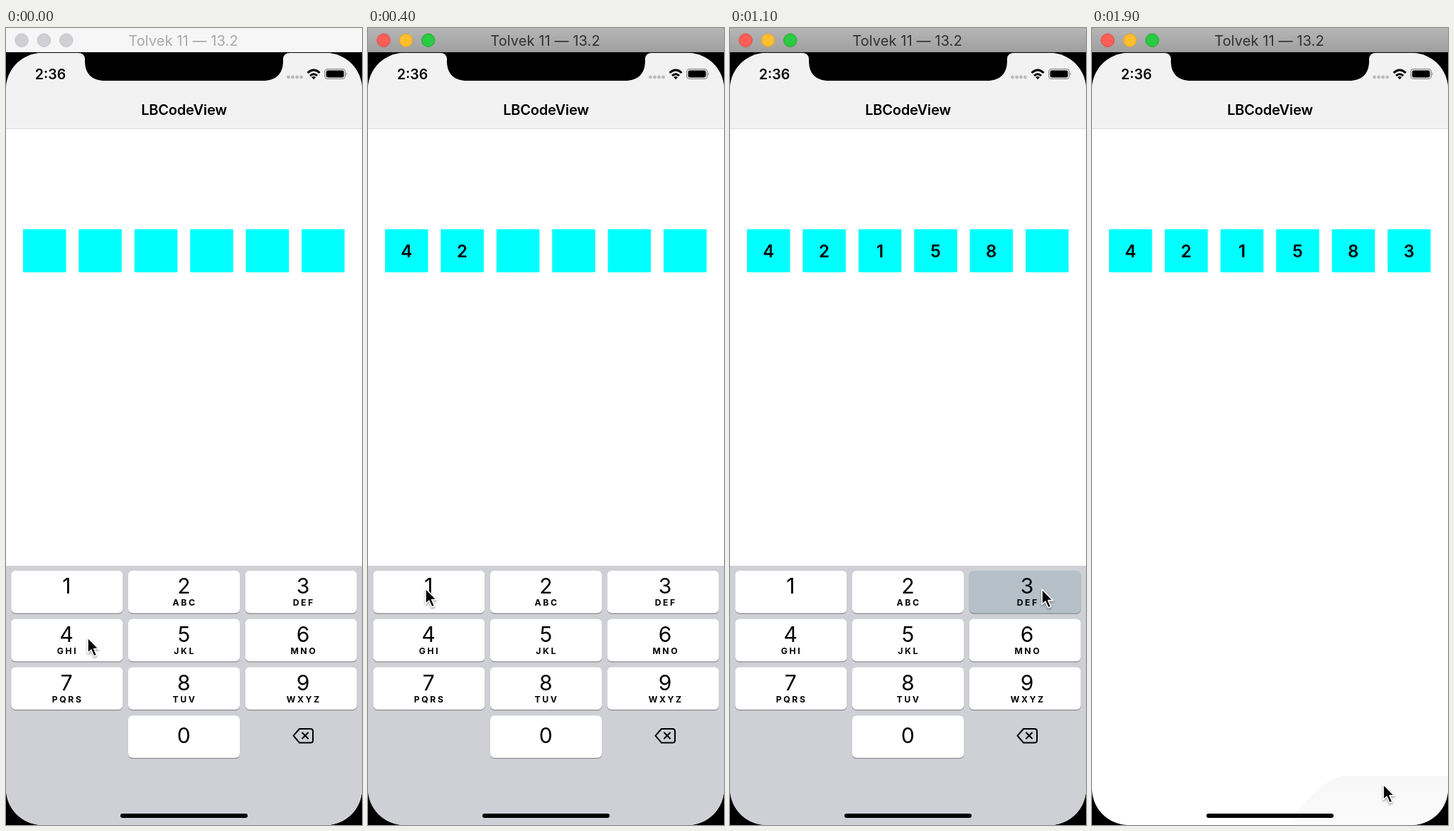
An HTML page for the animation above (2 s loop, 501 by 1119 pixels).

```html
<!DOCTYPE html>
<html lang="en">
<head>
<meta charset="utf-8">
<title>Code entry</title>
<style>
  html, body { margin: 0; width: 100%; height: 100%; overflow: hidden; background: #000; }
  svg { display: block; width: 501px; height: 1119px; font-family: Inter, sans-serif; }
  text { text-anchor: middle; }

  .loop, .cell, .key rect, #idle, #active, #keyboard, #cursor {
    animation: 2s step-end infinite;
  }
  .cell { font-size: 24px; font-weight: 600; }
  .num { font-size: 30px; }
  .abc { font-size: 12.2px; font-weight: 700; letter-spacing: 2.6px; }

  #idle { animation-name: blur; }
  #active { animation-name: focus; }
  @keyframes blur { 0% { opacity: 1 } 5%, to { opacity: 0 } }
  @keyframes focus { 0% { opacity: 0 } 5%, to { opacity: 1 } }

  #c0 { animation-name: focus; }
  #c1 { animation-name: type1; }
  #c2 { animation-name: type2; }
  #c3 { animation-name: type3; }
  #c4 { animation-name: type4; }
  #c5 { animation-name: type5; }
  @keyframes type1 { 0% { opacity: 0 } 15%, to { opacity: 1 } }
  @keyframes type2 { 0% { opacity: 0 } 25%, to { opacity: 1 } }
  @keyframes type3 { 0% { opacity: 0 } 35%, to { opacity: 1 } }
  @keyframes type4 { 0% { opacity: 0 } 45%, to { opacity: 1 } }
  @keyframes type5 { 0% { opacity: 0 } 60%, to { opacity: 1 } }

  .key .cap { fill: #fff; }
  #k2 .cap { animation-name: press2; }
  #k5 .cap { animation-name: press5; }
  #k3 .cap { animation-name: press3; }
  @keyframes press2 { 0% { fill: #fff } 10% { fill: #b5c0c9 } 15%, to { fill: #fff } }
  @keyframes press5 { 0% { fill: #fff } 30% { fill: #b5c0c9 } 35%, to { fill: #fff } }
  @keyframes press3 { 0% { fill: #fff } 55% { fill: #b5c0c9 } 60%, to { fill: #fff } }

  #keyboard { animation-name: dismiss; }
  @keyframes dismiss {
    0% { transform: translateY(0) }
    60% { transform: translateY(356px) }
    65%, to { transform: translateY(400px) }
  }

  #cursor { animation-name: point; filter: drop-shadow(0 2px 1.5px rgba(0, 0, 0, .35)); }
  @keyframes point {
    0% { transform: translate(115px, 856px) }
    10% { transform: translate(236px, 792px) }
    15% { transform: translate(228px, 790px) }
    20% { transform: translate(81px, 787px) }
    30% { transform: translate(229px, 856px) }
    35% { transform: translate(231px, 902px) }
    45% { transform: translate(330px, 850px) }
    50% { transform: translate(439px, 788px) }
    75% { transform: translate(437px, 806px) }
    80% { transform: translate(432px, 860px) }
    85% { transform: translate(424px, 940px) }
    90% { transform: translate(414px, 1030px) }
    95%, to { transform: translate(410px, 1062px) }
  }
</style>
</head>
<body>
<svg viewBox="0 0 501 1119">
  <defs>
    <linearGradient id="chrome" x2="0" y2="1">
      <stop stop-color="#b6b6b6"/><stop offset="1" stop-color="#9f9f9f"/>
    </linearGradient>
    <linearGradient id="haze" x2="0" y2="1">
      <stop stop-color="#f7f7f7"/><stop offset="1" stop-color="#fbfbfb"/>
    </linearGradient>
    <clipPath id="screen"><rect y="35" width="501" height="1084" rx="51"/></clipPath>
  </defs>

  <rect width="501" height="1119"/>
  <g id="idle"><rect width="501" height="34" fill="#f6f6f6"/></g>
  <g id="active"><rect width="501" height="34" fill="url(#chrome)"/></g>

  <g clip-path="url(#screen)">
    <rect y="35" width="501" height="1084" fill="#fff"/>
    <path d="M285 1103 Q318 1062 350 1050 H501 V1119 H285Z" fill="url(#haze)"/>
    <rect y="35" width="501" height="106" fill="#f2f2f2"/>
    <rect y="141" width="501" height="1" fill="#dedede"/>
    <g id="cells"></g>
    <g id="keyboard">
      <rect y="755" width="501" height="364" fill="#cfd0d6"/>
      <g id="keys"></g>
      <g fill="none" stroke="#000" stroke-width="2" stroke-linejoin="round" stroke-linecap="round">
        <path d="M413 984 H428.5 Q432 984 432 987.500 V1000 Q432 1003.500 428.500 1003.500 H413 L404.500 993.700Z"/>
        <path d="M417 989.500 l8 8 m0 -8 l-8 8"/>
      </g>
    </g>
    <rect x="161" y="1103" width="179" height="6" rx="3"/>
  </g>

  <path d="M102 34 V35 Q110 35 111 43 V46 C111 65 122 74 139 74 H362 C379 74 390 65 390 46 V43 Q391 35 399 35 V34Z"/>

  <text x="62.500" y="71.500" font-size="19.600" font-weight="600">2:36</text>
  <text x="250.500" y="121.500" font-size="20" font-weight="600" letter-spacing="-.2">LBCodeView</text>

  <g fill="#bcbcbc">
    <circle cx="397.500" cy="69" r="2.400"/><circle cx="403.500" cy="69" r="2.400"/>
    <circle cx="409.500" cy="69" r="2.400"/><circle cx="415.500" cy="69" r="2.400"/>
  </g>
  <g fill="none" stroke="#000" stroke-width="3">
    <path d="M424.500 63 Q433 55 441.500 63"/>
    <path d="M428 67 Q433 62.500 438 67"/>
  </g>
  <path d="M430 69 Q433 66.800 436 69 L433 72.200Z"/>
  <rect x="448.600" y="57.600" width="28.800" height="13.800" rx="4" fill="none" stroke="#8c8c8c" stroke-width="1.200"/>
  <rect x="450.500" y="59.500" width="25" height="10" rx="2.300"/>
  <path d="M478.700 62 Q481 64.500 478.700 67Z" fill="#8c8c8c"/>

  <g id="lights"></g>

  <g id="cursor">
    <path d="M0 0 V21.500 L4.800 17 L8.800 26 L12.700 24.300 L8.800 15.600 H15.500Z"
          stroke="#fff" stroke-width="1.600" stroke-linejoin="round"/>
  </g>
</svg>
<script>
  const put = (id, html) => { document.getElementById(id).innerHTML += html; };

  [...'421583'].forEach((digit, i) => {
    const x = 24 + i * 78.4;
    put('cells', `<rect x="${x}" y="282.5" width="60.5" height="60.5" fill="#0ff"/>
      <text id="c${i}" class="cell" x="${x + 30.2}" y="321.7">${digit}</text>`);
  });

  const letters = ['', 'ABC', 'DEF', 'GHI', 'JKL', 'MNO', 'PQRS', 'TUV', 'WXYZ'];
  const labelX = [85.3, 250.3, 418];
  const addKey = (num, col, row, abc) => {
    const x = 7.3 + col * 164.7, y = 762 + row * 67.8, mid = labelX[col];
    const base = y + (abc === undefined ? 39 : 32);
    put('keys', `<g id="k${num}" class="key">
      <rect x="${x}" y="${y + 1.3}" width="157" height="59.4" rx="6" fill="#898b8f"/>
      <rect class="cap" x="${x}" y="${y}" width="157" height="59.4" rx="6"/>
      <text class="num" x="${mid}" y="${base}">${num}</text>
      <text class="abc" x="${mid + 1.3}" y="${y + 49.3}">${abc || ''}</text></g>`);
  };
  letters.forEach((abc, i) => addKey(i + 1, i % 3, Math.floor(i / 3), abc));
  addKey(0, 1, 3);

  const chrome = (id, ink, fills, rims) => {
    fills.forEach((fill, i) => put(id,
      `<circle cx="${22 + i * 31.4}" cy="17.2" r="9.2" fill="${fill}" stroke="${rims[i]}"/>`));
    put(id, `<text x="249.5" y="25" font-size="20" letter-spacing=".1" fill="${ink}">Tolvek 11 — 13.2</text>`);
  };
  chrome('idle', '#a8a8a8', Array(3).fill('#d0cfd4'), Array(3).fill('#c2c1c6'));
  chrome('active', '#303030', ['#ff5f57', '#fdbe2f', '#2aca42'], ['#e2463f', '#e0a028', '#1dad2c']);
</script>
</body>
</html>
```
